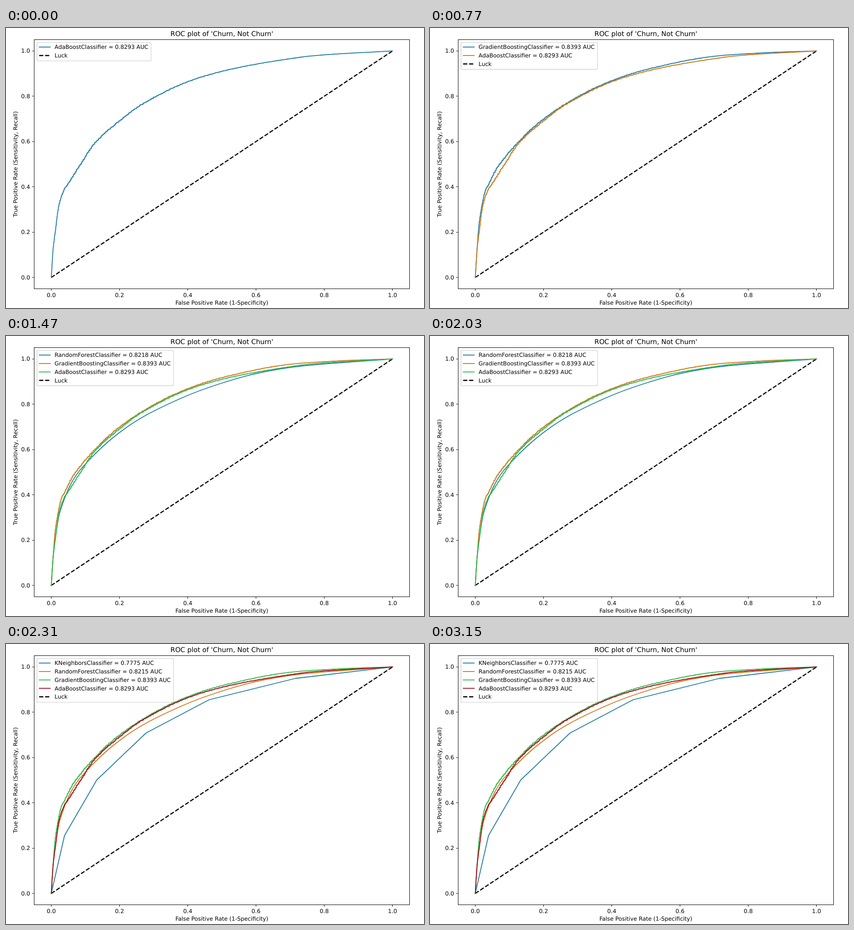
Recreate the animation shown at these times as an HTML page. Size 882 by 590 pixels, loop 3.22 s.

```html
<!DOCTYPE html>
<html lang="en">
<head>
<meta charset="utf-8">
<title>ROC plot</title>
<style>
html, body { margin: 0; width: 100%; height: 100%; overflow: hidden; background: #fff; }
svg { display: block; font: 11.85px "DejaVu Sans", sans-serif; text-rendering: geometricPrecision; }
.title { font-size: 14.22px; }
.axis { fill: none; stroke: #000; stroke-width: .95; }
.curve { fill: none; stroke-width: 1.8; stroke-linejoin: round; stroke-linecap: square; }
.luck { stroke: #000; stroke-width: 2.37; stroke-dasharray: 8.77 3.79; }
.box { fill: #fff; fill-opacity: .8; stroke: #ccc; stroke-width: 1.1; }
</style>
</head>
<body>
<svg id="plot" width="882" height="590" viewBox="0 0 882 590"></svg>
<script>
const LOOP = 3220;
const COLORS = ['#217ca3', '#cc7714', '#2cba4a', '#a80a1a'];
const FRAME = { x: 59.5, y: 24.5, width: 792, height: 525 };
const plot = document.getElementById('plot');

// Data coordinates, with a 5% margin on every side of the unit square
const toX = u => FRAME.x + FRAME.width * (u + .05) / 1.1;
const toY = v => FRAME.y + FRAME.height * (1.05 - v) / 1.1;

function add(parent, tag, attrs, text) {
  const node = document.createElementNS('http://www.w3.org/2000/svg', tag);
  for (const key in attrs) node.setAttribute(key, attrs[key]);
  if (text) node.textContent = text;
  parent.appendChild(node);
  return node;
}

const label = (parent, x, y, text, anchor = 'middle', more = {}) =>
  add(parent, 'text', { x, y, 'text-anchor': anchor, ...more }, text);

// Key points in pixels; every curve runs from corner to corner of the data square
const points = (...inner) =>
  [[toX(0), toY(0)], ...inner.map(([x, y]) => [x + .5, y + .5]), [toX(1), toY(1)]];

const ada = points([99, 465], [104, 425], [111, 374], [121, 343], [134, 322], [158, 285], [188, 241],
  [238, 196], [292, 157], [382, 113], [480, 85], [600, 64], [672, 56]);
const gradient = points([100, 450], [104, 405], [114, 350], [122, 331], [144, 290], [186, 240],
  [238, 192], [310, 145], [382, 111], [456, 87], [580, 61.5], [700, 52]);
const forest = points([99, 465], [107, 403], [114, 368], [135, 314], [160, 277], [220, 218],
  [285, 172], [375, 128], [448, 101], [530, 78], [625, 62.5]);
const neighbors = points([123, 403], [191, 286], [295, 187], [428, 117], [610, 72]);

const straight = pts => 'M' + pts.join('L');

// Centripetal Catmull-Rom spline through the points
function smooth(pts) {
  const knots = [0];
  for (let i = 1; i < pts.length; i++)
    knots.push(knots[i - 1] + Math.sqrt(Math.hypot(pts[i][0] - pts[i - 1][0], pts[i][1] - pts[i - 1][1])));
  const handle = (i, step) => {
    const a = Math.max(0, i - 1), b = Math.min(pts.length - 1, i + 1);
    return pts[i].map((p, k) => p + step * (pts[b][k] - pts[a][k]) / (knots[b] - knots[a]) / 3);
  };
  let d = 'M' + pts[0];
  for (let i = 1; i < pts.length; i++) {
    const step = knots[i] - knots[i - 1];
    d += `C${handle(i - 1, step)} ${handle(i, -step)} ${pts[i]}`;
  }
  return d;
}

// Adds the fine, uneven staircase of an empirical curve
function stairs(d) {
  const path = document.createElementNS('http://www.w3.org/2000/svg', 'path');
  path.setAttribute('d', d);
  const length = path.getTotalLength(), start = path.getPointAtLength(0);
  let seed = 7, out = `M${start.x} ${start.y}`;
  const random = () => (seed = seed * 16807 % 2147483647) / 2147483647;
  for (let s = 0; s < length;) {
    s = Math.min(length, s + .5 + 2 * random());
    const { x, y } = path.getPointAtLength(s);
    out += random() < .5 ? `V${y}H${x}` : `H${x}V${y}`;
  }
  return out;
}

const ADA = ['AdaBoostClassifier = 0.8293 AUC', stairs(smooth(ada))];
const GRADIENT = ['GradientBoostingClassifier = 0.8393 AUC', stairs(smooth(gradient))];
const randomForest = auc => [`RandomForestClassifier = ${auc} AUC`, smooth(forest)];
const NEIGHBORS = ['KNeighborsClassifier = 0.7775 AUC', straight(neighbors)];

const stages = [
  { start: 0, models: [ADA] },
  { start: 770, models: [GRADIENT, ADA] },
  { start: 1470, models: [randomForest('0.8218'), GRADIENT, ADA] },
  { start: 2100, models: [NEIGHBORS, randomForest('0.8215'), GRADIENT, ADA] }
];

function drawAxes() {
  label(plot, 455.5, 17, "ROC plot of 'Churn, Not Churn'", 'middle', { class: 'title' });
  label(plot, 455.5, 583, 'False Positive Rate (1-Specificity)');
  label(plot, 0, 0, 'True Positive Rate (Sensitivity, Recall)', 'middle',
    { transform: 'translate(24 287) rotate(-90)' });
  let ticks = '';
  for (let i = 0; i <= 5; i++) {
    const x = toX(i / 5), y = toY(i / 5), value = (i / 5).toFixed(1);
    ticks += `M${x} 549.5v4.1M59.5 ${Math.floor(y) + .5}h-4.1`;
    label(plot, x, 567, value);
    label(plot, 50.8, Math.round(y + 4.1), value, 'end');
  }
  add(plot, 'path', { class: 'axis', d: ticks });
  add(plot, 'path', { class: 'luck', d: straight(points()) });
}

function drawStage({ models }) {
  const group = add(plot, 'g', {});
  const rowY = i => 40.2 + 17.75 * i;
  models.forEach(([, d], i) => add(group, 'path', { class: 'curve', stroke: COLORS[i], d }));
  add(group, 'rect', { class: 'box', x: 65.5, y: 30.5, rx: 2.4,
    width: models.length > 1 ? 288 : 240.5, height: 21 + 17.8 * models.length });
  models.forEach(([name], i) => {
    add(group, 'path', { class: 'curve', stroke: COLORS[i], d: `M70.2 ${rowY(i)}h23` });
    label(group, 102.5, rowY(i) + 4.1, name, 'start');
  });
  const last = rowY(models.length);
  add(group, 'path', { class: 'luck', d: `M70 ${last}h23.7` });
  label(group, 102.5, last + 4.1, 'Luck', 'start');
  return group;
}

drawAxes();
const groups = stages.map(drawStage);
add(plot, 'rect', { class: 'axis', ...FRAME });

const begin = performance.now();
function tick() {
  const time = (performance.now() - begin) % LOOP;
  const current = stages.filter(s => s.start <= time).length - 1;
  groups.forEach((g, i) => { g.style.display = i === current ? '' : 'none'; });
  requestAnimationFrame(tick);
}
tick();
</script>
</body>
</html>
```
